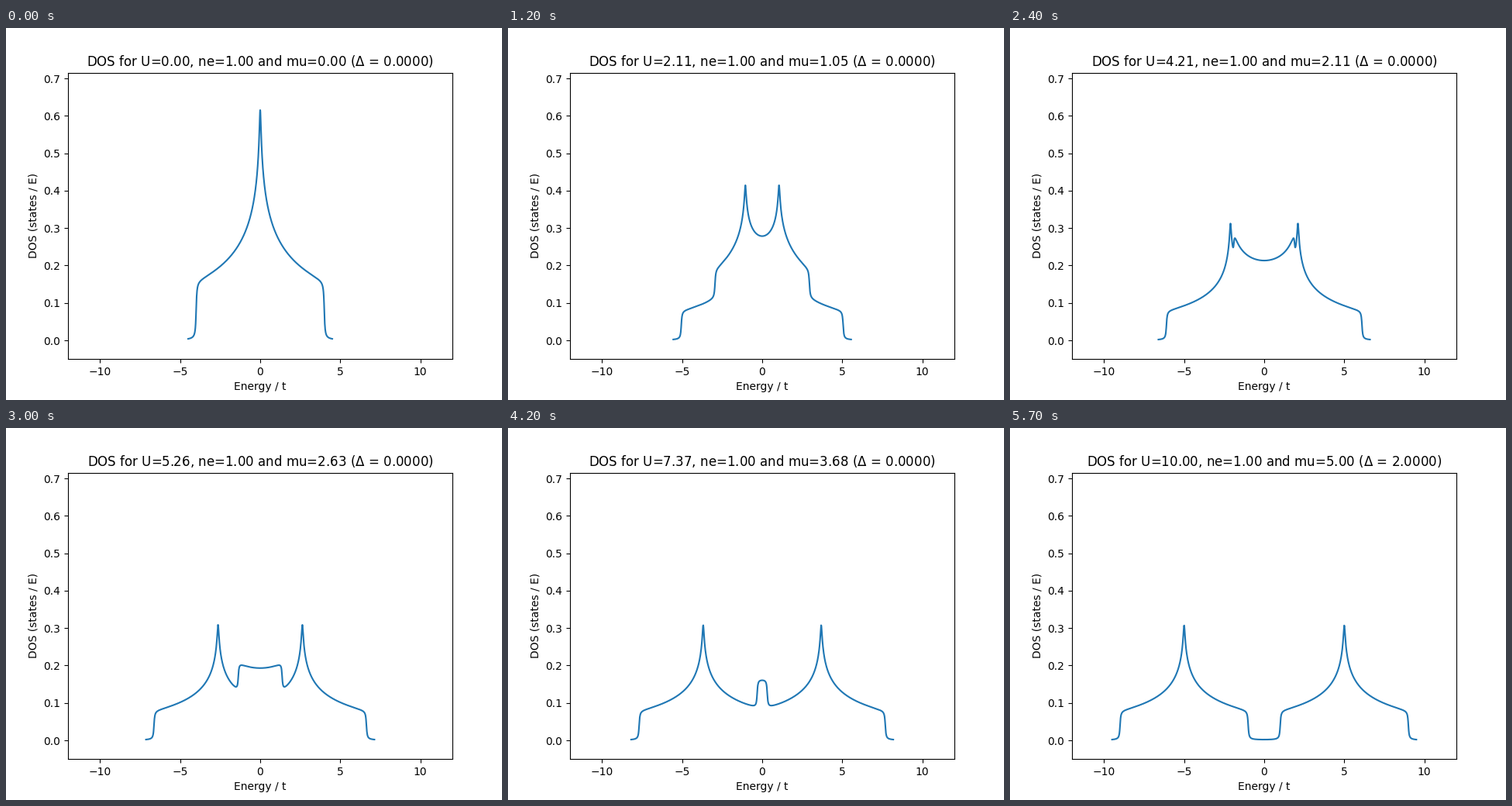
Recreate the animation shown at these times as a matplotlib script. Size 640 by 480 pixels, loop 6000 ms.

```python
import numpy as np
import matplotlib.pyplot as plt
from matplotlib.animation import FuncAnimation

FRAMES = 20
INTERVAL = 300
HALF_BAND = 4.0      # half bandwidth of the square lattice, in units of t
ETA = 0.0366         # Lorentzian broadening
POINTS = 1000
U_VALUES = np.linspace(0, 10, FRAMES)


def band_dos(energy):
    """Broadened square-lattice DOS, from G(z) = 1 / agm(z, sqrt(z^2 - 16))."""
    z = energy + 1j * ETA
    a, b = z, np.sqrt(z - HALF_BAND) * np.sqrt(z + HALF_BAND)
    for _ in range(12):
        a, b = (a + b) / 2, np.sqrt(a) * np.sqrt(b)
    return -(1 / a).imag / np.pi


def curve(u):
    edge = HALF_BAND + 0.5 + u / 2
    energy = np.linspace(-edge, edge, POINTS)
    return energy, band_dos(energy - u / 2) + band_dos(energy + u / 2)


def title_text(u):
    gap = max(0.0, u - 2 * HALF_BAND)
    return (f"DOS for U={u:.2f}, ne=1.00 and mu={u / 2:.2f} "
            rf"($\Delta$ = {gap:.4f})")


fig, ax = plt.subplots(figsize=(6.4, 4.8), dpi=100)
line, = ax.plot([], [], color="C0")
ax.set_xlim(-12, 12)
ax.set_ylim(-0.05, 0.7155)
ax.set_xlabel("Energy / t")
ax.set_ylabel("DOS (states / E)")
title = ax.set_title(title_text(0))


def update(i):
    u = U_VALUES[i]
    line.set_data(*curve(u))
    title.set_text(title_text(u))
    return line, title


anim = FuncAnimation(fig, update, frames=FRAMES, interval=INTERVAL,
                     init_func=lambda: update(0), repeat=True, repeat_delay=0)
plt.show()
```
